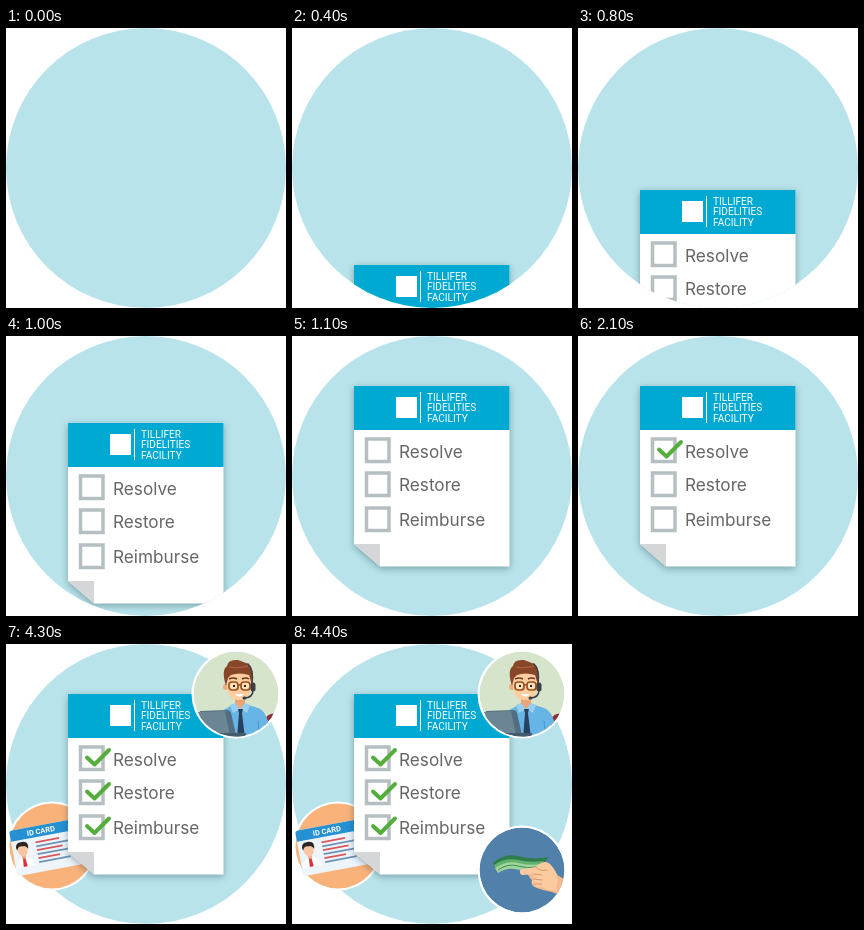
Write an HTML page that moves like this. It is 280 px wide and 280 px high and loops after 5.4 s.

```html
<!DOCTYPE html>
<html lang="en">
<head>
<meta charset="utf-8">
<title>Checklist</title>
<style>
html, body { margin: 0; width: 100%; height: 100%; overflow: hidden; background: #fff; }
svg { display: block; width: 100vw; height: 100vh; }
.item { font: 17.2px Inter, sans-serif; fill: #666; }
.brand { font: 10.1px Roboto, sans-serif; fill: #fff; }
.box { fill: #fff; stroke: #b5bec1; stroke-width: 3.5; }
.tick { fill: none; stroke: #55ae3c; stroke-width: 4; stroke-linecap: round; stroke-linejoin: round; }
.sheet { filter: drop-shadow(0 2px 3.5px rgba(30, 60, 70, .4)); }
</style>
</head>
<body>
<svg viewBox="0 0 280 280">
  <defs>
    <clipPath id="disc"><circle cx="140" cy="140" r="140"/></clipPath>
    <clipPath id="badge"><circle r="42.500"/></clipPath>
    <path id="tick" class="tick" d="M81 113.500L88.500 120.500L103 106"/>
  </defs>
  <circle cx="140" cy="140" r="140" fill="#b8e3eb"/>

  <!-- identity card -->
  <g data-at="3300">
    <circle cx="46" cy="202" r="44.500" fill="#fff"/>
    <circle cx="46" cy="202" r="42.500" fill="#f8b27a"/>
    <g transform="translate(3 187) rotate(-10.500)">
      <rect width="82" height="46" rx="3" fill="#edf5fb"/>
      <path d="M0 11V3Q0 0 3 0H82V11Z" fill="#2590d2"/>
      <text x="17" y="8.300" font-family="Roboto, sans-serif" font-size="7.500" font-weight="700" fill="#fff">ID CARD</text>
      <path d="M1 38Q2 29 10 29T20 38Z" fill="#fff"/>
      <path d="M8.800 29H11.200L12 38H8Z" fill="#d8343c"/>
      <rect x="8" y="25" width="4" height="5" fill="#eeb08b"/>
      <ellipse cx="10" cy="21" rx="5" ry="6.500" fill="#f8c6a2"/>
      <path d="M4.500 21Q2 13 10 13T15.500 21Q14 16.500 10 17.500Q6 16.500 4.500 21Z" fill="#2b2523"/>
      <g fill="none" stroke-width="1.800">
        <path d="M24 16H48M24 24H50M24 32H46" stroke="#d9565c"/>
        <path d="M24 20H60M24 28H60M24 36H56" stroke="#6f93b8"/>
      </g>
    </g>
  </g>

  <g clip-path="url(#disc)">
    <g id="doc">
      <g class="sheet">
        <path d="M62 50H217.500V230.500H88L62 208Z" fill="#fff"/>
        <path d="M62 208H88V230.500Z" fill="#d4d6d7"/>
      </g>
      <path d="M62 50H217.500V94H62Z" fill="#00a9d2"/>
      <rect x="104" y="61" width="21" height="21" fill="#fff"/>
      <path d="M128.500 56V87" stroke="#fff"/>
      <g class="brand">
        <text x="135" y="64.800">TILLIFER</text>
        <text x="135" y="75.300">FIDELITIES</text>
        <text x="135" y="86">FACILITY</text>
      </g>
      <g class="box">
        <rect x="74.500" y="103" width="22.500" height="22.500"/>
        <rect x="74.500" y="137" width="22.500" height="22.500"/>
        <rect x="74.500" y="172" width="22.500" height="22.500"/>
      </g>
      <g class="item">
        <text x="107" y="121.700">Resolve</text>
        <text x="107" y="154.900">Restore</text>
        <text x="107" y="190">Reimburse</text>
      </g>
    </g>
  </g>

  <use href="#tick" data-at="2100"/>
  <use href="#tick" y="34" data-at="3200"/>
  <use href="#tick" y="68.500" data-at="4300"/>

  <!-- support agent -->
  <g data-at="2200" transform="translate(230 50)">
    <circle r="44.500" fill="#fff"/>
    <g clip-path="url(#badge)">
      <circle r="42.500" fill="#d6e4cb"/>
      <path d="M29 25Q33 18 43 20V44H26Z" fill="#8d2f35"/>
      <path d="M-22 44Q-20 18 -9 14L-2 10H10L22 14Q33 18 35 44Z" fill="#66b5e6"/>
      <path d="M-1 3H9V11L4 16L-1 11Z" fill="#e9a576"/>
      <path d="M-1 9L4 15L-3 19L-6 11ZM9 9L4 15L11 19L14 11Z" fill="#98cef1"/>
      <path d="M2 15H7L6 19L9 44H1L3 19Z" fill="#27415f"/>
      <path d="M22 27L24 44" fill="none" stroke="#4795c8"/>
      <circle cx="-10" cy="-7" r="3" fill="#eeae80"/>
      <circle cx="16" cy="-7" r="3" fill="#eeae80"/>
      <path d="M-9 -22H15V-7Q14 6 3 6T-9 -7Z" fill="#fbcd9f"/>
      <path d="M-10 -8Q-15 -24 -9 -28Q-8 -35 2 -34L10 -31Q19 -29 16 -9L13 -19Q3 -22 -5 -19L-8 -16Z" fill="#87462a"/>
      <path d="M-6 -27Q2 -25 12 -28" fill="none" stroke="#a95d37" stroke-width="1.500"/>
      <g fill="#fde2b8" stroke="#9c4f20" stroke-width="1.700">
        <rect x="-7" y="-12" width="9" height="8" rx="3"/>
        <rect x="5" y="-12" width="9" height="8" rx="3"/>
        <path d="M2 -9H5"/>
      </g>
      <path d="M-7 -15Q-3 -17 1 -15M6 -15Q10 -17 13 -15" fill="none" stroke="#6c351f" stroke-width="1.500"/>
      <path d="M-3 -8h2M8 -8h2" stroke="#222" stroke-width="2"/>
      <path d="M-1 0Q3 5 8 0Z" fill="#fff"/>
      <g fill="none" stroke="#3c3f46" stroke-width="1.500" stroke-linecap="round">
        <path d="M16 -10Q18 -24 12 -30M17 -4Q17 4 8 4"/>
        <path d="M17 -9V-5" stroke-width="5"/>
        <path d="M8 4h1" stroke-width="3"/>
      </g>
      <path d="M-36 17L-9 16Q-6 16 -5 19L0 41H-33Z" fill="#526d80"/>
      <path d="M-38 18L-11 17L-6 41H-32Z" fill="#6b8595"/>
      <path d="M-33 39H10V43H-33Z" fill="#435c6c"/>
    </g>
  </g>

  <!-- hand with cash -->
  <g data-at="4400" transform="translate(230 226)">
    <circle r="44.500" fill="#fff"/>
    <g clip-path="url(#badge)">
      <circle r="42.500" fill="#5180ab"/>
      <path d="M5 -2L25 -6L34 4L43 10V27L30 22Q20 20 15 18Q8 16 10 10Q5 6 5 -2Z" fill="#f4b98c"/>
      <path d="M-29 -7Q-18 -17 -4 -14Q10 -10 27 -13L20 -5Q5 -3 -8 -5L-26 -1Z" fill="#2f7d4c"/>
      <path d="M-28 -5Q-17 -13 -4 -10Q8 -7 22 -9L16 -3Q4 -1 -8 -3L-25 1Z" fill="#62b26f"/>
      <path d="M-27 -2Q-15 -10 -4 -7Q6 -4 19 -6L12 -1Q2 1 -8 -1Q-16 -2 -24 3Z" fill="#a1d49a"/>
      <path d="M-24 0Q-14 -7 -4 -4T14 -3" fill="none" stroke="#3d8f55"/>
      <path d="M-2 2Q-3 -1 1 -1L14 -3Q22 -11 28 -6Q34 0 36 8L34 21Q24 20 19 17Q13 18 12 14Q8 12 11 8L12 4L1 5Q-2 5 -2 2Z" fill="#fcca9f"/>
      <path d="M12 4L20 5M11 9L20 10M12 14L20 14M14 -3Q18 2 25 0" fill="none" stroke="#d9966c" stroke-linecap="round"/>
    </g>
  </g>
</svg>
<script>
const LOOP = 5400, STEP = 100;
const doc = document.getElementById('doc');
const parts = document.querySelectorAll('[data-at]');

// The sheet climbs in three stretches, each faster than the last.
function sheetTop(step) {
  if (step < 1) return 300;
  if (step <= 4) return 275 - 12.5 * (step - 1);
  if (step <= 8) return 237.5 - 18.75 * (step - 4);
  return Math.max(50, 162.5 - 37.5 * (step - 8));
}

function draw(now) {
  const time = now % LOOP;
  const top = Math.floor(sheetTop(Math.floor(time / STEP)));
  doc.setAttribute('transform', `translate(0 ${top - 50})`);
  for (const part of parts) {
    part.style.visibility = time >= part.dataset.at ? 'visible' : 'hidden';
  }
}

function tick() {
  draw(performance.now());
  requestAnimationFrame(tick);
}
tick();
</script>
</body>
</html>
```
